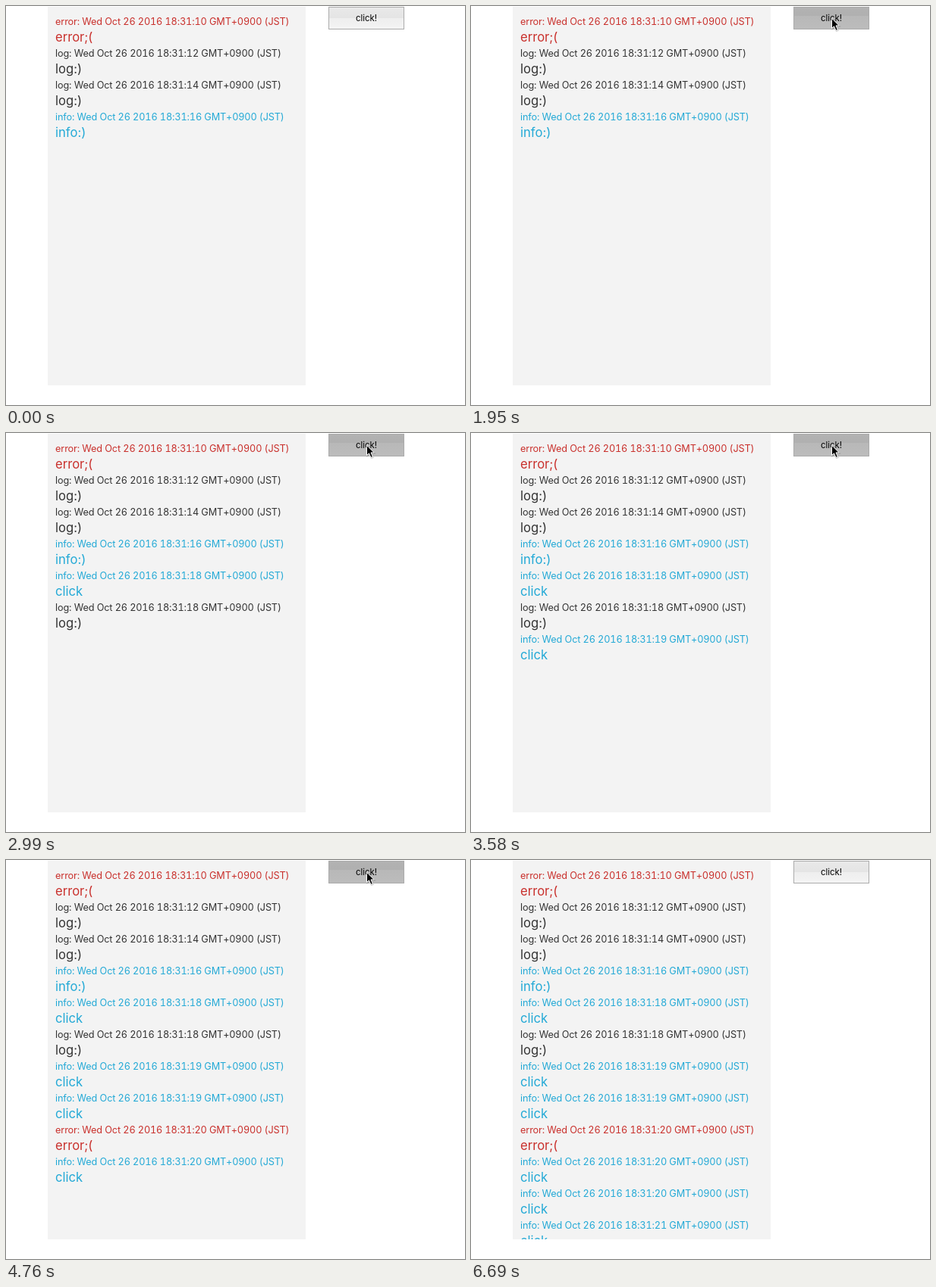
These frames come from a looping animation (605 by 527 pixels, 6.95 s). An HTML page:

```html
<!DOCTYPE html>
<html lang="en">
<head>
<meta charset="utf-8">
<title>Log panel</title>
<style>
  html, body { margin: 0; width: 100%; height: 100%; overflow: hidden; background: #fff; }
  body { position: relative; font-family: Inter, "Noto Sans CJK JP", sans-serif; }

  /* every animation shares one stepped loop */
  .list, .down, .cursor { animation: 6950ms step-end infinite; }

  .panel {
    position: absolute; left: 55px; top: 1px; width: 340px; height: 500px;
    overflow: hidden; background: #f3f3f3;
  }
  .list {
    --row: 42px;
    position: absolute; left: 10px; top: 9px; right: 0; overflow: hidden;
    animation-name: grow;
  }
  .row { height: 42px; line-height: 21px; white-space: nowrap; color: #333; }
  .row div { height: 21px; }
  .stamp { font-size: 12.7px; letter-spacing: -.12px; font-variant-numeric: tabular-nums; }
  .text { font-size: 16.6px; }
  .row.error { color: #c9302c; }
  .row.info { color: #23a9d6; }

  .button {
    position: absolute; left: 425px; top: 1px; width: 98px; height: 28px;
    border: 1px solid #ababab; overflow: hidden;
    background: linear-gradient(#e9e9e9, #e4e4e4 14px, #eee 14px, #f4f4f4);
  }
  .down {
    position: absolute; inset: 0; opacity: 0;
    background: linear-gradient(#b2b2b2, #b0b0b0 11px, #b8b8b8 11px, #bcbcbc);
    animation-name: press;
  }
  .label {
    position: absolute; inset: 0; text-align: center;
    font-size: 11.4px; line-height: 28px; color: #000;
  }
  .cursor {
    position: absolute; left: 0; top: 0; width: 14px; height: 19px;
    visibility: hidden; animation-name: move;
  }

  @keyframes grow {
    0%      { height: calc(4 * var(--row)); }
    30.071% { height: calc(6 * var(--row)); }
    45.035% { height: calc(7 * var(--row)); }
    53.669% { height: calc(8 * var(--row)); }
    57.985% { height: calc(9 * var(--row)); }
    62.158% { height: calc(10 * var(--row)); }
    70.647% { height: calc(11 * var(--row)); }
    77.122%, 100% { height: calc(12 * var(--row)); }
  }
  @keyframes press {
    0%, 30.071%, 45.035%, 53.669%, 62.158%, 70.647%, 77.122%, 100% { opacity: 0; }
    28.057%, 43.021%, 51.51%, 60%, 68.489%, 74.964% { opacity: 1; }
  }
  @keyframes move {
    0%      { visibility: hidden; transform: translate(489px, 461px); }
    6.474%  { visibility: visible; transform: translate(489px, 461px); }
    8.633%  { visibility: visible; transform: translate(483px, -1px); }
    12.949% { visibility: visible; transform: translate(482px, -3px); }
    15.107% { visibility: visible; transform: translate(474px, 15px); }
    87.913% { visibility: visible; transform: translate(479px, 25px); }
    90.071% { visibility: visible; transform: translate(599px, 469px); }
    94.244% { visibility: visible; transform: translate(575px, 526px); }
    96.258%, 100% { visibility: hidden; transform: translate(575px, 526px); }
  }
</style>
</head>
<body>
<div class="panel"><div class="list" id="list"></div></div>
<div class="button"><div class="down"></div><div class="label">click!</div></div>
<svg class="cursor" viewBox="0 0 14 19">
  <path d="M1.5 1.2V14.6L4.5 11.8L7 17.4L9.4 16.4L7 10.9H11.2Z" transform="translate(.6 .9)" fill="none" stroke="#000" stroke-opacity=".18" stroke-width="1.4"/>
  <path d="M1.5 1.2V14.6L4.5 11.8L7 17.4L9.4 16.4L7 10.9H11.2Z" fill="#000" stroke="#fff" stroke-width="1"/>
</svg>
<script>
  const entries = [
    ["error", 10, "error;("], ["log", 12, "log:)"], ["log", 14, "log:)"],
    ["info", 16, "info:)"], ["info", 18, "click"], ["log", 18, "log:)"],
    ["info", 19, "click"], ["info", 19, "click"], ["error", 20, "error;("],
    ["info", 20, "click"], ["info", 20, "click"], ["info", 21, "click"]
  ];

  function addLine(row, cls, text) {
    const line = document.createElement("div");
    line.className = cls;
    line.textContent = text;
    row.append(line);
  }

  for (const [level, sec, text] of entries) {
    const row = document.createElement("div");
    row.className = "row " + level;
    addLine(row, "stamp", `${level}: Wed Oct 26 2016 18:31:${sec} GMT+0900 (JST)`);
    addLine(row, "text", text);
    document.getElementById("list").append(row);
  }
</script>
</body>
</html>
```
